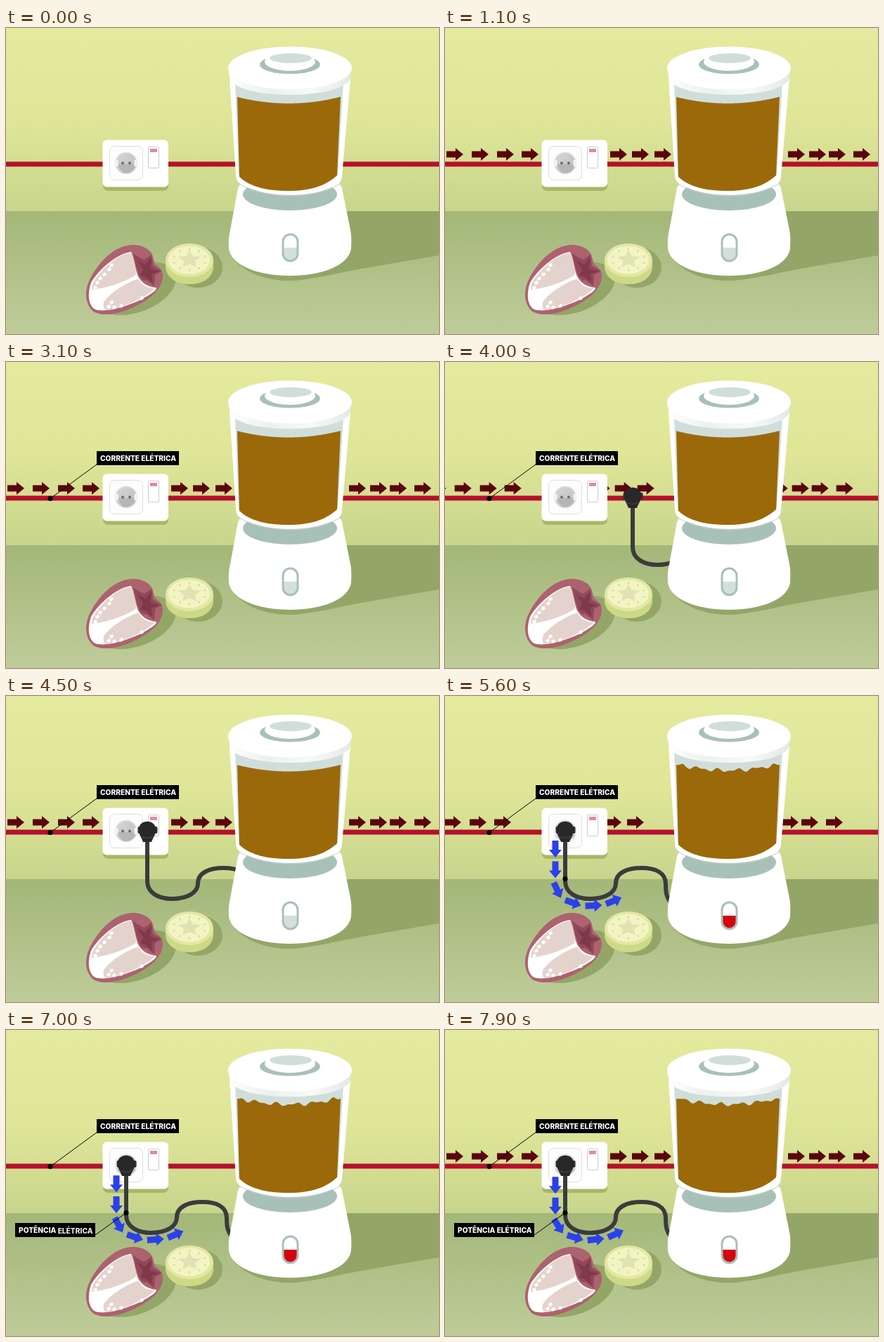
Recreate the animation shown at these times as an HTML page with a canvas. Size 616 px wide and 436 px high, loop 8000 ms.

```html
<!DOCTYPE html>
<html lang="pt">
<head>
<meta charset="utf-8">
<title>Corrente elétrica</title>
<style>
html, body { margin: 0; width: 100%; height: 100%; overflow: hidden; }
canvas { display: block; }
svg { position: absolute; width: 0; height: 0; }
</style>
</head>
<body>
<canvas id="stage" width="616" height="436"></canvas>
<svg><path id="flow" d="M157 190V258C155 282 170 292 190 297C212 301 230 298 252 286"/></svg>
<script>
const ctx = document.getElementById('stage').getContext('2d');
const flow = document.getElementById('flow');
const LOOP = 8000, STEP = 100;
const TEAL = '#a8c1b8', PALE = '#d0dedb', SHADE = '#93a668';

// Linear interpolation through [time, value] pairs
function key(t, pts) {
  if (t <= pts[0][0]) return pts[0][1];
  for (let i = 1; i < pts.length; i++) {
    const [a, u] = pts[i - 1], [b, v] = pts[i];
    if (t <= b) return u + (v - u) * (t - a) / (b - a);
  }
  return pts[pts.length - 1][1];
}
const ramp = (t, a, b) => key(t, [[a, 0], [b, 1]]);

function fill(d, color) {
  ctx.fillStyle = color;
  ctx.fill(new Path2D(d));
}
function line(d, color, width) {
  ctx.strokeStyle = color;
  ctx.lineWidth = width;
  ctx.stroke(new Path2D(d));
}
function oval(x, y, rx, ry, color, turn = 0) {
  ctx.fillStyle = color;
  ctx.beginPath();
  ctx.ellipse(x, y, rx, ry, turn, 0, 7);
  ctx.fill();
}
function box(x, y, w, h, r, color, edge, width = 1) {
  ctx.beginPath();
  ctx.roundRect(x, y, w, h, r);
  if (color) { ctx.fillStyle = color; ctx.fill(); }
  if (edge) { ctx.strokeStyle = edge; ctx.lineWidth = width; ctx.stroke(); }
}
function fade(x0, y0, x1, y1, ...colors) {
  const g = ctx.createLinearGradient(x0, y0, x1, y1);
  colors.forEach((c, i) => g.addColorStop(i / (colors.length - 1), c));
  return g;
}
function clipped(x, w, draw) {
  ctx.save();
  ctx.beginPath();
  ctx.rect(x, 0, w, 436);
  ctx.clip();
  draw();
  ctx.restore();
}
function arrow(x, y, turn, color) {
  ctx.save();
  ctx.translate(x, y);
  ctx.rotate(turn);
  fill('M-12-4.5H1V-9L12 0L1 9V4.5H-12Z', color);
  ctx.restore();
}

function room() {
  ctx.fillStyle = fade(0, 0, 0, 261, '#e4ea9e', '#dfe698', '#c8d58c');
  ctx.fillRect(0, 0, 616, 261);
  ctx.fillStyle = fade(0, 261, 0, 436, '#a3b778', '#bfcc9a');
  ctx.fillRect(0, 261, 616, 175);
  fill('M470 261H616V324L500 344C470 350 440 357 410 360C375 361 345 352 324 330Z', SHADE);
  ctx.fillStyle = '#b5102c';
  ctx.fillRect(0, 190.5, 616, 7);
}

function wallArrows(t) {
  const dx = key((t + 200) % 1800, [[200, -136], [400, -39], [700, -17], [900, 0]]);
  const rows = [[0, 14, 50, 86, 121], [185, 247, 278, 310], [400, 500, 530, 558, 593]];
  for (const [left, ...xs] of rows)
    clipped(left, 616 - left, () => xs.forEach(x => arrow(x + dx, 180, 0, '#5b0410')));
}

function socket() {
  box(138, 166, 93, 66, 7, '#a6b866');
  box(137.5, 159.5, 93.5, 67, 6, '#fff');
  box(147.5, 168.5, 47, 48, 7, '#fdfdfd', '#dedede');
  oval(171, 192.5, 16, 16, '#e3e3e4');
  oval(171, 192.5, 14.5, 14.5, fade(160, 182, 182, 203, '#d2d3d4', '#bfc0c2'));
  fill('M158 194H184A13.5 13.5 0 0 1 166 206Z', '#b5b6b8');
  box(156, 188, 3.5, 9, 0, '#f4f4f4');
  box(182.5, 188, 3.5, 9, 0, '#f4f4f4');
  oval(166, 192.5, 2, 2, '#75695f');
  oval(176, 192.5, 2, 2, '#75695f');
  box(202.5, 169.5, 15, 30, 1, '#fff', '#c9cbcd');
  box(205, 172, 10, 5, 0, '#dc8e9e');
}

function plug(t) {
  const dx = key(t, [[3500, 180], [4000, 96], [4500, 30], [4800, 0]]);
  clipped(0, 400, () => {
    ctx.translate(dx, 0);
    line('M171 200V264C171 281 188 289 206 289C228 289 243 280 243 267C243 251 261 245 279 245' +
      'C300 245 314 252 314 268C314 280 315 287 321 294', '#3b3b3b', 6);
    box(157.5, 186, 28, 10, 2, '#303030');
    fill('M159 190C159 175 183 175 183 190C183 198 179 202 177 208H165C163 202 159 198 159 190Z', '#282828');
    line('M162 200Q171 205 180 200', '#3d3d3d', 1.5);
  });
}

function liquid(t) {
  const on = ramp(t, 5000, 5300), s = t / 1000;
  const p = new Path2D();
  p.moveTo(332, 212);
  for (let x = 329; x <= 476; x++) {
    const u = (x - 402) / 74, edge = Math.min(1, (1 - u * u) * 4);
    const wave = 1.8 * Math.sin(x * .23 + s * 5.1) + 1.3 * Math.sin(x * .39 - s * 3.7) - 1.5;
    p.lineTo(x, 98 + 9.5 * (1 - u * u) + on * edge * wave);
  }
  p.lineTo(471, 210);
  p.bezierCurveTo(453, 227, 428, 232, 403, 232);
  p.bezierCurveTo(372, 232, 348, 227, 332, 212);
  ctx.fillStyle = '#9b690a';
  ctx.fill(p);
}

function blender(t) {
  fill('M330 228Q333 219 345 219H463Q476 219 478 228L490 288Q492 297 491 314C488 338 450 353 404 353' +
    'C358 353 320 338 317 314Q316 300 319 288Z', '#fff');
  oval(404, 237, 67, 23, TEAL);
  fill('M318 72L327 210Q327 220 337 224Q365 238 404 238Q443 238 470 224Q478 220 478 211L490 72Z', '#fff');
  line('M328 219Q331 222 337 225Q365 239 404 239Q443 239 470 225Q476 222 478 219', '#c3d2ca', 1);
  fill('M326 78L331 210Q365 232 403 232Q440 232 472 208L480 78Z', PALE);
  liquid(t);

  fill('M316 57L319 74C327 87 361 95 404 95C447 95 481 87 489 74L492 57Z',
    fade(316, 0, 492, 0, '#ffffff', '#edf0ef', '#f8f9f9', '#e3e8e6'));
  oval(404, 57, 88, 30.5, '#fff');
  oval(404, 52, 43, 13.5, TEAL);
  oval(404, 48, 36, 13, '#fff');
  oval(405, 43, 30, 7, PALE);

  box(394, 294, 21, 38, 10.5, '#fff');
  fill('M394 313H415V322A10.5 10.5 0 0 1 394 322Z', t >= 5200 ? '#d4040f' : '#d3dfdb');
  box(394, 294, 21, 38, 10.5, null, TEAL, 3);
}

function fruit() {
  oval(184, 371, 60, 34, SHADE, -.35);
  fill('M181 309C193 309 205 315 208 323C211 330 210 335 214 338C224 345 224 353 222 361' +
    'C218 375 203 388 181 398C160 408 139 411 126 405C113 396 111 377 118 361C130 335 154 309 181 309Z', '#ad626f');
  fill('M178 319C158 321 131 345 121 363C115 381 118 396 127 401C142 406 170 397 190 388' +
    'C206 380 215 373 214 370C201 369 193 363 188 354C184 345 183 330 178 319Z', '#fff');
  fill('M175 321C158 323 135 344 124 363Q121 371 123 373C140 371 164 364 183 353Q186 350 185 346L180 324Q179 320 175 321Z', '#e4d3cc');
  fill('M186 358C169 364 147 378 139 391Q137 401 144 402C165 399 196 386 212 371Q197 371 190 360Q188 357 186 358Z', '#e4d3cc');
  const seeds = [[127, 370], [130, 363], [134, 357], [140, 351], [147, 344], [150, 338],
    [150, 391], [146, 397], [154, 398], [164, 396], [193, 385]];
  for (const [x, y] of seeds) oval(x, y, 2.8, 2.4, '#fff', -.5);
  fill('M181 321Q190 328 197 330L207 323L209 339L222 346L212 352L211 368L200 359Q194 361 190 354Q184 338 181 321Z', '#91485a');
  fill('M187 331L198 337L207 327L205 343L219 347L207 350L208 363L198 354L191 353L195 344Z', '#7e3a49');
}

function slice() {
  oval(273, 341, 35, 29, SHADE);
  fill('M227 331V342C229 357 244 365 261 365C279 365 293 357 295 342V331Z', '#cdd986');
  oval(261, 331, 34, 24, '#e2e8a2');
  oval(260.5, 330.5, 29.5, 20, '#f3f4c4');
  ctx.beginPath();
  for (let i = 0; i < 10; i++) {
    const a = i * Math.PI / 5 - Math.PI / 2, r = i % 2 ? 8 : 17;
    ctx.lineTo(261 + r * Math.cos(a), 330 + r * .78 * Math.sin(a));
  }
  ctx.fillStyle = '#dfe2b2';
  ctx.fill();
  for (let i = 0; i < 10; i++) {
    const a = (i + .5) * Math.PI / 5;
    oval(261 + 23 * Math.cos(a), 330 + 15 * Math.sin(a), 2, 1, '#d3d99a', a);
  }
}

function cordArrows(t) {
  if (t < 4800) return;
  const shift = key(t, [[4800, -180], [5200, -30], [5500, -.5], [5600, 0], [7000, 1.3], [7900, 3.2]]);
  for (let i = 0; i < 6; i++) {
    const s = 28 + i * 29.6 + shift;
    if (s < 18) continue;
    const p = flow.getPointAtLength(s), a = flow.getPointAtLength(s - 4), b = flow.getPointAtLength(s + 4);
    arrow(p.x, p.y, Math.atan2(b.y - a.y, b.x - a.x), '#2b40ea');
  }
}

function label(t, dot, tip, x, y, w, words) {
  if (t < 0) return;
  const [dx, dy] = dot, k = ramp(t, 0, 300), grow = ramp(t, 250, 600);
  oval(dx, dy, 3.6, 3.6, '#000');
  line(`M${dx} ${dy}L${dx + (tip[0] - dx) * k} ${dy + (tip[1] - dy) * k}`, '#000', 1);
  if (!grow) return;
  const top = y + key(t, [[700, 6], [800, 1], [900, 0]]);
  const left = tip[0] > x ? x + w * (1 - grow) : x;
  ctx.fillStyle = '#000';
  ctx.fillRect(left, top, w * grow, 20);
  ctx.font = '800 10.2px Inter, "Open Sans", sans-serif';
  ctx.fillStyle = '#fff';
  let at = x + 5;
  words.forEach((word, i) => {
    const a = i ? ramp(t, 900, 1450) : ramp(t, 550, 850);
    ctx.globalAlpha = a;
    ctx.fillText(word, at, top + 14.2 + (i ? 4 * (1 - a) : 0));
    at += ctx.measureText(word + ' ').width;
  });
  ctx.globalAlpha = 1;
}

function draw(t) {
  room();
  wallArrows(t);
  socket();
  plug(t);
  blender(t);
  fruit();
  slice();
  cordArrows(t);
  label(t - 1600, [63, 194.5], [129, 146], 129, 127, 117, ['CORRENTE', 'ELÉTRICA']);
  label(t - 5600, [171, 260.5], [127, 292], 13, 275, 114, ['POTÊNCIA', 'ELÉTRICA']);
}

const start = performance.now();
function tick() {
  const t = (performance.now() - start) % LOOP;
  draw(Math.floor(t / STEP) * STEP);
  requestAnimationFrame(tick);
}
tick();
</script>
</body>
</html>
```
